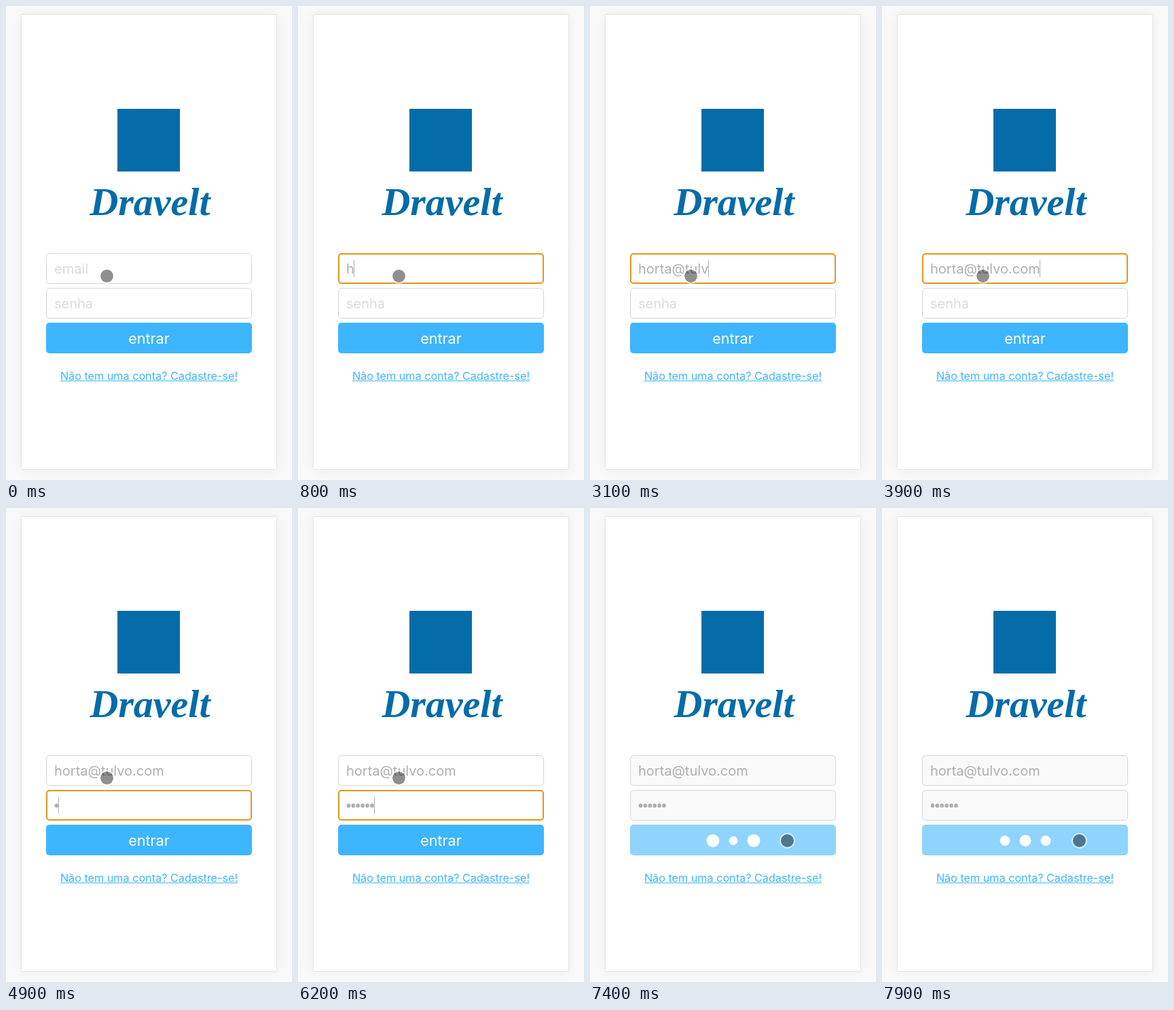
These frames come from a looping animation (421x696 px, 8 s). An HTML page with a canvas:

```html
<!DOCTYPE html>
<html lang="pt">
<head>
<meta charset="utf-8">
<title>Login</title>
<style>
html, body { margin: 0; width: 421px; height: 696px; overflow: hidden; background: #f9f9f9; }
canvas { display: block; }
</style>
</head>
<body>
<canvas id="stage" width="421" height="696"></canvas>
<script>
const ctx = document.getElementById('stage').getContext('2d');
const LOOP = 8000, TICK = 100;
const FOCUS_EMAIL = 300, FOCUS_PASSWORD = 4100, SUBMIT = 7400;
const EMAIL = 'horta@tulvo.com';
const emailKeys = [800, 900, 1100, 1400, 1500, 2100, 2400, 2700, 3000, 3100, 3300, 3500, 3700, 3800, 3900];
const passwordKeys = [4900, 5100, 5300, 5600, 6000, 6200];
const pointerPath = [[0, 148.5, 396.5], [6700, 141, 402], [6800, 185, 434], [6900, 263, 477], [7000, 290.5, 488.5]];
const FIELD_X = 59, FIELD_W = 303, FIELD_H = 45, TEXT_X = 71;
const BLUE = '#3eb5ff', INK = '#afafaf', DOT_STEP = 6.9;

const typed = (keys, t) => keys.filter(k => k <= t).length;

function roundRect(x, y, w, h, r, fill, stroke, line = 1) {
  ctx.beginPath();
  ctx.roundRect(x, y, w, h, r);
  if (fill) { ctx.fillStyle = fill; ctx.fill(); }
  if (stroke) { ctx.strokeStyle = stroke; ctx.lineWidth = line; ctx.stroke(); }
}

function disc(x, y, r, color) {
  ctx.fillStyle = color;
  ctx.beginPath();
  ctx.arc(x, y, r, 0, Math.PI * 2);
  ctx.fill();
}

function text(str, x, y, size, color, align = 'left') {
  ctx.font = `${size}px Inter, sans-serif`;
  ctx.textAlign = align;
  ctx.fillStyle = color;
  ctx.fillText(str, x, y);
  return ctx.measureText(str).width;
}

function drawCard() {
  ctx.fillStyle = '#f9f9f9';
  ctx.fillRect(0, 0, 421, 696);
  ctx.save();
  ctx.shadowColor = 'rgba(0,0,0,0.06)';
  ctx.shadowBlur = 20;
  roundRect(22.5, 12.5, 376, 668, 2, '#fff');
  ctx.restore();
  roundRect(22.5, 12.5, 376, 668, 2, null, '#e2e4e4');
}

function drawBrand() {
  ctx.fillStyle = '#036ca9';
  ctx.fillRect(164, 151, 92, 92);
  ctx.font = 'italic bold 58px "Liberation Serif", serif';
  ctx.textAlign = 'center';
  ctx.fillText('Dravelt', 212, 307);
}

function drawField(y, placeholder, count, focused, disabled, drawValue) {
  const inset = focused ? 1 : 0.5;
  roundRect(FIELD_X + inset, y + inset, FIELD_W - 2 * inset, FIELD_H - 2 * inset, focused ? 4 : 5,
    disabled ? '#f9f9f9' : '#fff', focused ? '#e5951a' : '#d5d5d5', 2 * inset);
  let width = 0;
  if (count) width = drawValue(count);
  else text(placeholder, TEXT_X, y + 30, 20, '#dbdbdb');
  if (focused) {
    ctx.fillStyle = INK;
    ctx.fillRect(Math.floor(TEXT_X + width), y + 10, 1, 25);
  }
}

function drawPassword(count) {
  for (let i = 0; i < count; i++) disc(TEXT_X + DOT_STEP * (i + 0.5), 437, 2.9, INK);
  return count * DOT_STEP;
}

function drawButton(t, disabled) {
  roundRect(FIELD_X, 465, FIELD_W, FIELD_H, 5, disabled ? '#8fd3ff' : BLUE);
  if (!disabled) {
    text('entrar', 210.5, 496, 21.5, '#fff', 'center');
    return;
  }
  const phase = (t - SUBMIT + 50) % 800 / 400;
  const swing = 1 - Math.abs(1 - phase);
  [181, 211, 241].forEach((x, i) => disc(x, 488.5, i === 1 ? 6 + 4 * swing : 10 - 4 * swing, '#fff'));
}

function drawLink() {
  const width = text('Não tem uma conta? Cadastre-se!', 210.5, 549, 16.2, BLUE, 'center');
  ctx.fillRect(210.5 - width / 2, 550, width, 1);
}

function drawPointer(t) {
  const [, x, y] = pointerPath.filter(p => p[0] <= t).pop();
  disc(x, y, 9.5, 'rgba(0,0,0,0.44)');
  ctx.strokeStyle = 'rgba(255,255,255,0.5)';
  ctx.lineWidth = 2;
  ctx.beginPath();
  ctx.arc(x, y, 10.5, 0, Math.PI * 2);
  ctx.stroke();
}

function draw(t) {
  const disabled = t >= SUBMIT;
  drawCard();
  drawBrand();
  drawField(363, 'email', typed(emailKeys, t), t >= FOCUS_EMAIL && t < FOCUS_PASSWORD, disabled,
    n => text(EMAIL.slice(0, n), TEXT_X, 393, 20, INK));
  drawField(414, 'senha', typed(passwordKeys, t), t >= FOCUS_PASSWORD && !disabled, disabled, drawPassword);
  drawButton(t, disabled);
  drawLink();
  drawPointer(t);
}

function frame() {
  const t = performance.now() % LOOP;
  draw(Math.floor(t / TICK) * TICK);
  requestAnimationFrame(frame);
}
frame();
</script>
</body>
</html>
```
